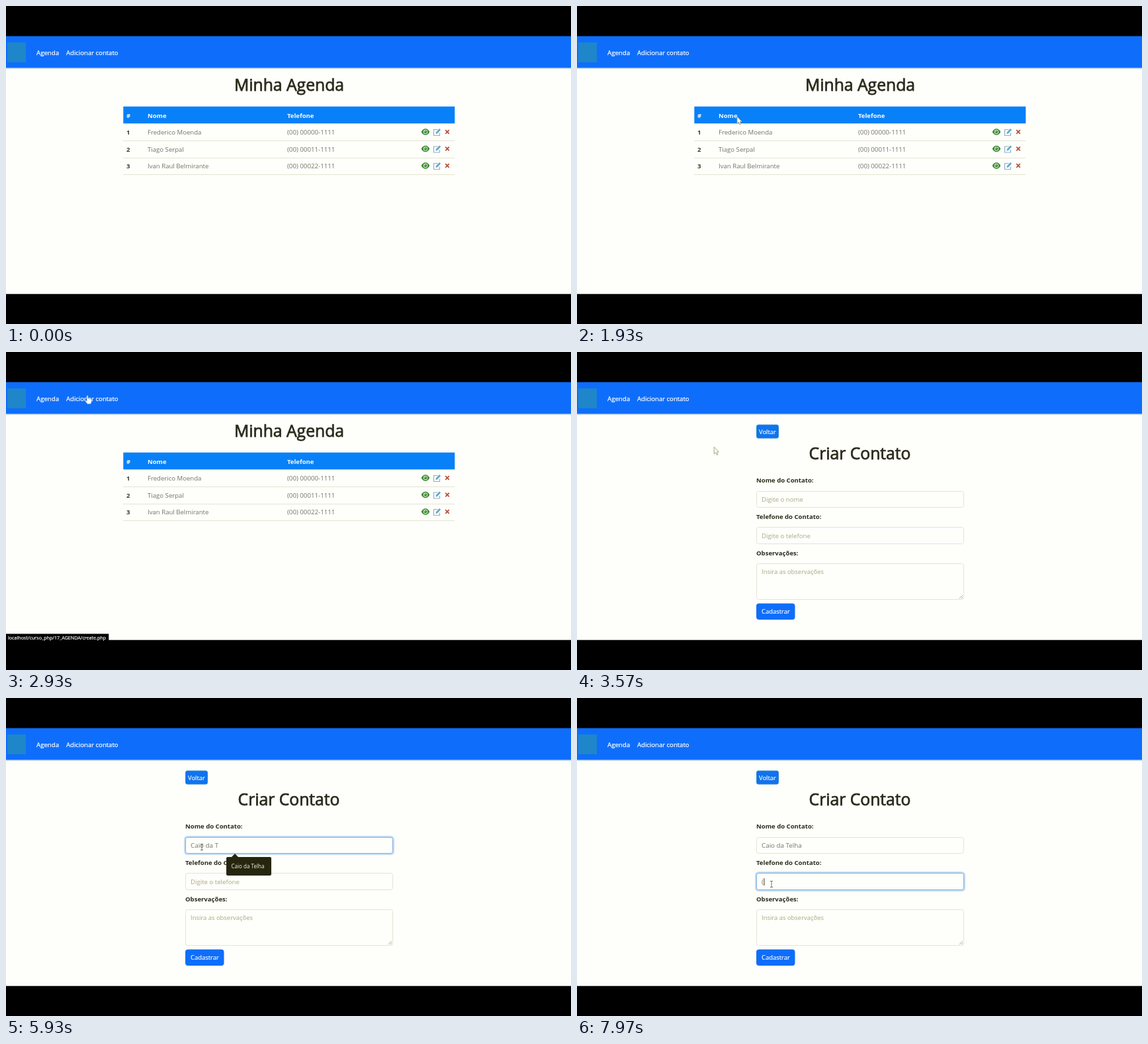
Animation of 854x480 px, one loop 8 s. Source, as an HTML page with a canvas:

```html
<!DOCTYPE html>
<html lang="pt">
<head>
<meta charset="utf-8">
<title>Minha Agenda</title>
<style>
html, body { margin: 0; width: 100%; height: 100%; overflow: hidden; background: #000; }
canvas { display: block; width: 854px; height: 480px; }
</style>
</head>
<body>
<canvas id="stage"></canvas>
<script>
const W = 854, H = 480, LOOP = 8000;
const canvas = document.getElementById('stage');
const ctx = canvas.getContext('2d');
const dpr = window.devicePixelRatio || 1;
canvas.width = W * dpr;
canvas.height = H * dpr;

const PAGE = '#fefefb', BLUE = '#0e6efb', HEAD = '#0880f8', WHITE = '#f8faff';
const DARK = '#2b2b1c', BODY = '#747466', HINT = '#a8a880', LINE = '#e4e4d2';
const FAMILY = '"Open Sans", "Noto Sans", sans-serif';

const PEOPLE = [
  ['Frederico Moenda', '(00) 00000-1111'],
  ['Tiago Serpal', '(00) 00011-1111'],
  ['Ivan Raul Belmirante', '(00) 00022-1111']
];
const NAME = 'Caio da Telha';
const NAME_KEYS = [3950, 4040, 4130, 4220, 4310, 4390, 4700, 4950, 5310, 6080, 6220, 6370, 6520];
const OPEN_FORM = 3200, FOCUS_NAME = 3850, FOCUS_PHONE = 7200, PHONE_KEY = 7850;

// Pointer stops: time, x, y
const PATH = [
  [600, 755, 148], [1180, 511, 282], [1330, 511, 282], [1900, 242, 167],
  [2000, 242, 167], [2650, 123, 66], [3350, 123, 66], [3800, 296, 225],
  [6650, 296, 225], [7100, 294, 281]
];

// "heavy" is the width of an outline that thickens the letters
function text(str, x, y, size, color, weight = 400, heavy = 0) {
  ctx.font = `${weight} ${size}px ${FAMILY}`;
  ctx.fillStyle = color;
  ctx.fillText(str, x, y);
  if (heavy) {
    ctx.strokeStyle = color;
    ctx.lineWidth = heavy;
    ctx.lineJoin = 'round';
    ctx.strokeText(str, x, y);
  }
}

function title(str, x, y) {
  ctx.textAlign = 'center';
  text(str, x, y, 24.7, DARK, 400, 0.75);
  ctx.textAlign = 'left';
}

function rect(x, y, w, h, color) {
  ctx.fillStyle = color;
  ctx.fillRect(x, y, w, h);
}

function box(x, y, w, h, r, fill, stroke, width = 1) {
  ctx.beginPath();
  ctx.roundRect(x, y, w, h, r);
  if (fill) { ctx.fillStyle = fill; ctx.fill(); }
  if (stroke) { ctx.strokeStyle = stroke; ctx.lineWidth = width; ctx.stroke(); }
}

function poly(points, fill, stroke, width = 1) {
  ctx.beginPath();
  points.forEach(([x, y]) => ctx.lineTo(x, y));
  ctx.closePath();
  if (fill) { ctx.fillStyle = fill; ctx.fill(); }
  if (stroke) { ctx.strokeStyle = stroke; ctx.lineWidth = width; ctx.stroke(); }
}

function at(x, y, draw) {
  ctx.save();
  ctx.translate(x, y);
  draw();
  ctx.restore();
}

function dot(x, y, r, color) {
  ctx.beginPath();
  ctx.arc(x, y, r, 0, 7);
  ctx.fillStyle = color;
  ctx.fill();
}

function eye() {
  ctx.beginPath();
  ctx.moveTo(-6.3, 0);
  ctx.bezierCurveTo(-3.5, -6.3, 3.5, -6.3, 6.3, 0);
  ctx.bezierCurveTo(3.5, 6.3, -3.5, 6.3, -6.3, 0);
  ctx.fillStyle = '#3a8a30';
  ctx.fill();
  dot(0, 0, 3.2, '#e4efdf');
  dot(0, 0, 2.3, '#3a8a30');
  dot(-0.8, -0.8, 0.8, '#e4efdf');
}

function pencil() {
  ctx.strokeStyle = '#86b4cf';
  ctx.lineWidth = 1.2;
  ctx.beginPath();
  ctx.moveTo(1, -4);
  ctx.lineTo(-5, -4);
  ctx.lineTo(-5, 5);
  ctx.lineTo(4, 5);
  ctx.lineTo(4, 1);
  ctx.stroke();
  poly([[-2, 2.6], [-1.6, 0], [3.6, -5.4], [5.6, -3.4], [0.4, 2]], '#6aa5c8');
}

function cross() {
  ctx.strokeStyle = '#b8523c';
  ctx.lineWidth = 1.8;
  ctx.beginPath();
  ctx.moveTo(-2.8, -2.8);
  ctx.lineTo(2.8, 2.8);
  ctx.moveTo(2.8, -2.8);
  ctx.lineTo(-2.8, 2.8);
  ctx.stroke();
}

function frame() {
  rect(0, 0, W, H, '#000');
  rect(0, 46, W, 388.7, PAGE);
  rect(0, 45.5, W, 48, BLUE);
  rect(0, 94, W, 1, '#d3e0ea');
  rect(2, 55, 28, 30, '#1f86c9');
  text('Agenda', 46, 74, 9.7, WHITE, 400, 0.25);
  text('Adicionar contato', 91, 74, 9.55, WHITE, 400, 0.25);
}

function listPage() {
  title('Minha Agenda', 428, 128);
  rect(177.3, 151.7, 501, 25.6, HEAD);
  text('#', 182, 168.5, 9.5, WHITE, 700);
  text('Nome', 214, 168.5, 9.5, WHITE, 700);
  text('Telefone', 425, 168.5, 9.5, WHITE, 700);
  PEOPLE.forEach(([name, phone], i) => {
    const y = 190.5 + i * 25.5;
    text(i + 1, 182, y + 3.7, 9.6, '#3a3a2c', 700);
    text(name, 214, y + 3.7, 9.6, BODY);
    text(phone, 425, y + 3.7, 9.7, BODY);
    at(634, y - 0.5, eye);
    at(651.5, y, pencil);
    at(667, y - 0.5, cross);
    rect(177, Math.round(y + 12.6), 501, 1, LINE);
  });
}

function field(y, h, focused) {
  if (focused) box(270.5, y - 0.5, 315, h + 1, 4, null, '#c4dcf2', 3);
  box(271.5, y + 0.5, 313, h - 1, 3, PAGE, focused ? '#7fb2e0' : LINE);
}

function value(str, hint, y, caretOn) {
  text(str || hint, 279, y, str ? 9.8 : 9.65, str ? BODY : HINT);
  if (caretOn) {
    const w = str ? ctx.measureText(str).width : 0;
    rect(279.5 + w, y - 9, 1, 11, '#3c3c28');
  }
}

function blink(t, since) {
  return (t - since) % 1000 < 500;
}

function popup() {
  poly([[340, 241], [346, 235], [352, 241]], '#26260f');
  box(333, 240, 68, 28, 2, '#26260f');
  text(NAME, 340.5, 257, 8.05, '#f2f2e2');
}

function formPage(t) {
  const onPhone = t >= FOCUS_PHONE;
  const onName = t >= FOCUS_NAME && !onPhone;
  const keys = NAME_KEYS.filter(k => k <= t);
  const name = NAME.slice(0, keys.length);
  const lastKey = keys.length ? keys[keys.length - 1] : FOCUS_NAME;
  const typedPhone = t >= PHONE_KEY;

  box(271.5, 110, 33, 20, 2.5, '#0f74ee', '#2a86cf');
  text('Voltar', 275, 123.7, 9.4, WHITE, 400, 0.2);
  title('Criar Contato', 427.5, 162);

  text('Nome do Contato:', 271, 197.3, 9.55, DARK, 700);
  field(210, 25, onName);
  value(name, 'Digite o nome', 226.3, onName && blink(t, lastKey));

  text('Telefone do Contato:', 271, 251.8, 9.55, DARK, 700);
  field(264, 26, onPhone);
  value(typedPhone ? '(' : '', 'Digite o telefone', 281,
    onPhone && blink(t, typedPhone ? PHONE_KEY : FOCUS_PHONE));

  text('Observações:', 271, 306.5, 9.55, DARK, 700);
  field(319, 55, false);
  text('Insira as observações', 279, 335.3, 9.45, HINT);
  ctx.strokeStyle = '#9a9a70';
  ctx.lineWidth = 0.8;
  ctx.beginPath();
  ctx.moveTo(578, 372);
  ctx.lineTo(583, 367);
  ctx.moveTo(581, 372);
  ctx.lineTo(583, 370);
  ctx.stroke();

  box(271.5, 380, 57.5, 23.5, 3, BLUE, '#1a6ee6');
  text('Cadastrar', 279, 395.4, 9.45, WHITE, 400, 0.2);

  if (onName && t >= NAME_KEYS[0] + 50) popup();
}

function arrow() {
  poly([[0, 0], [0, 10.5], [2.4, 8.4], [4, 12], [5.8, 11.2], [4.3, 7.7], [7.2, 7.5]],
    '#fffff4', '#9c9c72', 0.9);
}

function hand() {
  poly([[-1, 0], [0.8, 0], [1.2, 4], [5.5, 5], [6.6, 6.4], [5.8, 10.5], [4.6, 12.3],
    [0, 12.3], [-3, 8.2], [-2.4, 7.2], [-0.6, 8]], '#fff', '#8fa8c8', 0.7);
}

function ibeam() {
  ctx.strokeStyle = '#77775a';
  ctx.lineWidth = 1;
  ctx.beginPath();
  ctx.moveTo(-2, -4.5);
  ctx.lineTo(2, -4.5);
  ctx.moveTo(0, -4.5);
  ctx.lineTo(0, 4.5);
  ctx.moveTo(-2, 4.5);
  ctx.lineTo(2, 4.5);
  ctx.stroke();
}

function pointer(t) {
  if (t < PATH[0][0]) return null;
  const i = PATH.findIndex(p => p[0] > t);
  if (i < 0) return PATH[PATH.length - 1].slice(1);
  const [t0, x0, y0] = PATH[i - 1], [t1, x1, y1] = PATH[i];
  const u = (t - t0) / (t1 - t0), e = u * u * (3 - 2 * u);
  return [x0 + (x1 - x0) * e, y0 + (y1 - y0) * e];
}

function drawPointer(t, form) {
  const p = pointer(t);
  if (!p) return;
  const [x, y] = p;
  const overLink = x > 91 && x < 169 && y > 58 && y < 82;
  const overField = form && x > 271 && x < 585 &&
    ((y > 210 && y < 235) || (y > 264 && y < 290));
  if (overLink) {
    rect(0, 425.4, 155.3, 10, '#000');
    text('localhost/curso_php/17_AGENDA/create.php', 3, 433.8, 7.15, '#fff', 400, 0.2);
  }
  at(x, y, overLink ? hand : overField ? ibeam : arrow);
}

function draw(now) {
  const t = now % LOOP;
  const form = t >= OPEN_FORM;
  ctx.setTransform(dpr, 0, 0, dpr, 0, 0);
  frame();
  if (form) formPage(t); else listPage();
  drawPointer(t, form);
}

const start = performance.now();
function tick() {
  draw(performance.now() - start);
  requestAnimationFrame(tick);
}
tick();
</script>
</body>
</html>
```
